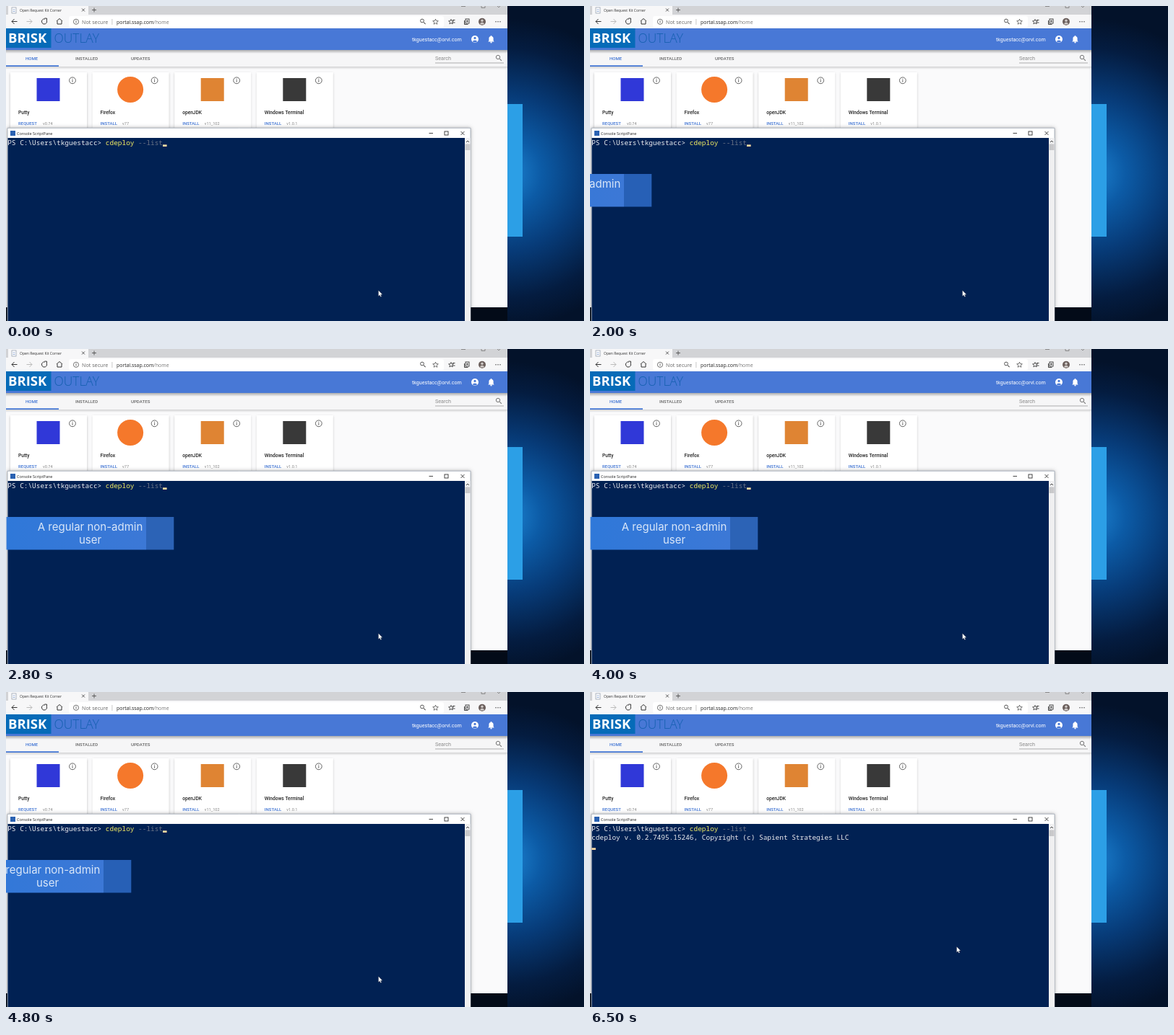
Animation of 800x437 px, one loop 8 s. Source, as an HTML page with a canvas:

```html
<!DOCTYPE html>
<html lang="en">
<head>
<meta charset="utf-8">
<title>Deploy demo</title>
<style>
html, body { margin: 0; width: 100%; height: 100%; overflow: hidden; background: #03122a; }
canvas { display: block; width: 800px; height: 437px; }
</style>
</head>
<body>
<canvas id="stage" width="800" height="437"></canvas>
<script>
const LOOP = 8000, STEP = 100;
const ctx = document.getElementById('stage').getContext('2d');
const ROBOTO = 'Roboto, sans-serif';
const UI = '"Open Sans", sans-serif';
const MONO = '"Noto Sans Mono", monospace';
const BLUE = '#3f74d4';

function rect(x, y, w, h, color) {
  ctx.fillStyle = color;
  ctx.fillRect(x, y, w, h);
}

function text(str, x, y, size, color, family = ROBOTO, weight = 400, align = 'left') {
  ctx.font = `${weight} ${size}px ${family}`;
  ctx.textAlign = align;
  ctx.fillStyle = color;
  ctx.fillText(str, x, y);
}

function disc(x, y, r, color) {
  ctx.fillStyle = color;
  ctx.beginPath();
  ctx.arc(x, y, r, 0, Math.PI * 2);
  ctx.fill();
}

function ring(x, y, r, color, width = 0.9, from = 0, to = Math.PI * 2) {
  ctx.strokeStyle = color;
  ctx.lineWidth = width;
  ctx.beginPath();
  ctx.arc(x, y, r, from, to);
  ctx.stroke();
}

function path(points, color, width = 1, close = false) {
  ctx.strokeStyle = color;
  ctx.lineWidth = width;
  ctx.beginPath();
  points.forEach(([x, y], i) => i ? ctx.lineTo(x, y) : ctx.moveTo(x, y));
  if (close) ctx.closePath();
  ctx.stroke();
}

function cross(x, y, r, color, width) {
  path([[x - r, y - r], [x + r, y + r]], color, width);
  path([[x + r, y - r], [x - r, y + r]], color, width);
}

function shade(y, h, alpha) {
  const g = ctx.createLinearGradient(0, y, 0, y + h);
  g.addColorStop(0, `rgba(0,0,0,${alpha})`);
  g.addColorStop(1, 'rgba(0,0,0,0)');
  rect(0, y, 694, h, g);
}

function info(x, y, r, color) {
  ring(x, y, r, color, 0.9);
  rect(x - 0.5, y - 0.6, 1, r * 0.62, color);
  rect(x - 0.5, y - r * 0.55, 1, 1, color);
}

function magnifier(x, y, r, color) {
  ring(x - 1, y - 1, r, color, 1);
  path([[x + r * 0.5, y + r * 0.5], [x + r + 1.2, y + r + 1.2]], color, 1.1);
}

function star(x, y, r, color) {
  const pts = [];
  for (let i = 0; i < 10; i++) {
    const a = i * Math.PI / 5 - Math.PI / 2, d = i % 2 ? r * 0.45 : r;
    pts.push([x + d * Math.cos(a), y + d * Math.sin(a)]);
  }
  path(pts, color, 0.8, true);
}

function desktop() {
  rect(0, 0, 800, 437, '#03122a');
  const glow = ctx.createRadialGradient(690, 232, 10, 690, 232, 215);
  glow.addColorStop(0, '#1a7cca');
  glow.addColorStop(0.2, '#0c5ba6');
  glow.addColorStop(0.48, '#073b78');
  glow.addColorStop(0.8, '#041c40');
  glow.addColorStop(1, '#03122a');
  rect(643, 0, 157, 437, glow);
  rect(531, 136, 184, 184, '#2c9fe6');
  rect(0, 418, 694, 19, '#030b18');
}

function tabStrip() {
  rect(0, 0, 694, 13, '#d2d3d6');
  rect(3, 0, 111, 13, '#f7f7f8');
  ctx.fillStyle = '#fff';
  ctx.fillRect(8, 2, 6, 8);
  ctx.strokeStyle = '#8b96a6';
  ctx.lineWidth = 0.7;
  ctx.strokeRect(8, 2, 6, 8);
  path([[9.5, 5], [12.5, 5]], '#6d8ec4', 0.7);
  path([[9.5, 7.5], [12.5, 7.5]], '#6d8ec4', 0.7);
  text('Open Request Kit Corner', 19, 7.6, 5, '#333', UI);
  cross(107, 5.5, 2, '#333', 0.8);
  path([[119, 5.5], [125, 5.5]], '#444', 0.8);
  path([[122, 2.5], [122, 8.5]], '#444', 0.8);
  path([[630, 0.5], [636, 0.5]], '#777', 0.8);
  path([[658, 0], [658, 2.5], [663, 2.5], [663, 0]], '#777', 0.8);
  path([[680, 0], [682, 2], [684, 0]], '#777', 0.8);
}

function toolbar() {
  rect(0, 12, 694, 19, '#f7f7f8');
  ctx.fillStyle = '#fff';
  ctx.beginPath();
  ctx.roundRect(87, 14, 519, 16, 3);
  ctx.fill();
  path([[15.5, 21.5], [8, 21.5]], '#333', 1);
  path([[11.5, 18], [8, 21.5], [11.5, 25]], '#333', 1);
  path([[28.5, 21.5], [36, 21.5]], '#bbb', 1);
  path([[32.5, 18], [36, 21.5], [32.5, 25]], '#bbb', 1);
  ring(53, 21.5, 3.6, '#333', 1, -0.4, 5);
  path([[53.5, 17], [56.5, 17.2], [56.3, 20]], '#333', 1);
  path([[70, 21], [74, 17.5], [78, 21]], '#333', 1);
  path([[71, 21], [71, 25], [77, 25], [77, 21]], '#333', 1);
  info(97, 21.8, 3.6, '#666');
  text('Not secure', 105, 24.5, 7.2, '#666', UI);
  rect(146.5, 18, 0.8, 8, '#bbb');
  text('portal.ssap.com', 153, 24.5, 6.9, '#222', UI);
  const end = 153 + ctx.measureText('portal.ssap.com').width;
  text('/home', end, 24.5, 6.9, '#777', UI);

  magnifier(577, 21.5, 2.4, '#555');
  star(594.5, 22, 4, '#555');
  star(616, 22, 3.6, '#333');
  path([[618, 23], [621.5, 23]], '#333', 0.9);
  path([[618, 19.5], [621.5, 19.5]], '#333', 0.9);
  ctx.strokeStyle = '#333';
  ctx.lineWidth = 0.9;
  ctx.strokeRect(636, 18, 5, 6);
  path([[634.5, 20], [634.5, 25.5], [639.5, 25.5]], '#333', 0.9);
  path([[637, 21], [640, 21]], '#333', 0.8);
  path([[638.5, 19.5], [638.5, 22.5]], '#333', 0.8);
  disc(659, 21.8, 5, '#6b5f5c');
  disc(659, 20.3, 1.7, '#d0cbc8');
  ctx.fillStyle = '#d0cbc8';
  ctx.beginPath();
  ctx.arc(659, 25.5, 2.8, Math.PI, 0);
  ctx.fill();
  for (const x of [678, 681, 684]) disc(x, 21.8, 0.7, '#333');
}

function header() {
  rect(0, 31, 694, 30, '#4878d6');
  rect(0, 31, 62.5, 27, '#066bb8');
  text('BRISK', 3, 51, 18.5, '#fff', UI, 700);
  text('OUTLAY', 66.5, 51, 17.4, '#1560b0', UI, 300);
  text('tkguestacc@orvl.com', 562, 48.5, 7.1, '#fff');

  disc(649, 46, 5, '#fff');
  disc(649, 44.4, 1.6, '#4878d6');
  ctx.fillStyle = '#4878d6';
  ctx.beginPath();
  ctx.ellipse(649, 48.9, 2.9, 1.5, 0, 0, Math.PI * 2);
  ctx.fill();

  ctx.fillStyle = '#fff';
  ctx.beginPath();
  ctx.moveTo(667.3, 49.5);
  ctx.lineTo(668.4, 48);
  ctx.lineTo(668.4, 45);
  ctx.arc(671.5, 45, 3.1, Math.PI, 0);
  ctx.lineTo(674.6, 48);
  ctx.lineTo(675.7, 49.5);
  ctx.fill();
  disc(671.5, 50.4, 1.1, '#fff');
  disc(671.5, 41.8, 0.9, '#fff');
}

function nav() {
  rect(0, 61, 694, 23, '#f6f6f7');
  shade(61, 5, 0.3);
  text('HOME', 27, 75, 6.1, BLUE, ROBOTO, 500);
  text('INSTALLED', 96, 75, 6.1, '#666', ROBOTO, 500);
  text('UPDATES', 173, 75, 6.1, '#666', ROBOTO, 500);
  rect(0, 82.3, 73, 1.7, BLUE);
  text('Search', 594, 75, 7.2, '#8a8a8a');
  rect(594, 78.6, 95, 0.8, '#999');
  magnifier(682, 72, 2.7, '#777');
  shade(84, 4, 0.16);
}

const apps = [
  { name: 'Putty', action: 'REQUEST', version: 'v0.74', color: '#3038d8' },
  { name: 'Firefox', action: 'INSTALL', version: 'v77', color: '#f5782b', round: true },
  { name: 'openJDK', action: 'INSTALL', version: 'v11_102', color: '#df8433' },
  { name: 'Windows Terminal', action: 'INSTALL', version: 'v1.0.1', color: '#393939' }
];

function card(app, i) {
  const x = 6 + i * 113.6;
  ctx.save();
  ctx.shadowColor = 'rgba(0,0,0,.25)';
  ctx.shadowBlur = 3;
  ctx.shadowOffsetY = 0.8;
  rect(x, 92, 106, 90, '#fff');
  ctx.restore();
  if (app.round) disc(x + 52.5, 116, 18, app.color);
  else rect(x + 36.5, 100, 32, 32, app.color);
  info(x + 86, 103.3, 4.4, '#555');
  text(app.name, x + 11, 150, 6.6, '#222', ROBOTO, 500);
  text(app.action, x + 11, 165, 6, BLUE, ROBOTO, 500);
  text(app.version, x + (i ? 41.5 : 45), 165, 5.6, '#888');
}

function browser() {
  rect(0, 0, 694, 418, '#fafafb');
  tabStrip();
  toolbar();
  header();
  nav();
  apps.forEach(card);
}

function consoleWindow(t) {
  ctx.save();
  ctx.shadowColor = 'rgba(0,0,0,.35)';
  ctx.shadowBlur = 5;
  rect(2, 169, 641, 270, '#fff');
  ctx.restore();
  path([[2, 437], [2, 169.3], [643, 169.3], [643, 437]], '#8f98a8', 0.7);
  rect(6, 173, 7, 7, '#2b62b2');
  text('Console ScriptPane', 15, 178.6, 5.5, '#222', UI);
  path([[585.5, 176.5], [591, 176.5]], '#333', 0.9);
  ctx.strokeStyle = '#333';
  ctx.lineWidth = 0.9;
  ctx.strokeRect(607, 174, 5, 5);
  cross(632, 176.5, 2.5, '#333', 0.9);

  rect(2.5, 183, 632.5, 254, '#012153');
  rect(635, 183, 7.7, 254, '#f0f0f1');
  path([[637, 189], [639, 187], [641, 189]], '#444', 1);
  rect(635.5, 191.5, 7, 8.5, '#c9c9cb');

  const size = 9.44, entered = t >= 6200;
  let x = 2.2;
  for (const [part, color] of [
    ['PS C:\\Users\\tkguestacc> ', '#eeedf0'],
    ['cdeploy ', '#f4ec63'],
    ['--list', '#6b7386']
  ]) {
    text(part, x, 193, size, color, MONO);
    x += ctx.measureText(part).width;
  }
  if (t >= 6300) {
    text('cdeploy v. 0.2.7495.15246, Copyright (c) Sapient Strategies LLC',
      2.2, 205, size, '#eeedf0', MONO);
  }
  const row = t >= 6300 ? 2 : 1;
  if (entered) rect(2.3, 192.3 + row * 12, 5.6, 2.7, '#fbd9a2');
  else rect(217, 192.3, 5.6, 2.7, '#fbd9a2');
}

// Distance of the caption left of its resting place
function captionShift(t) {
  const slide = 233;
  if (t < 2800) return slide * Math.pow(1 - (t - 1900) / 900, 3.9);
  if (t < 4200) return 0;
  return slide * Math.pow((t - 4200) / 900, 3.4);
}

function caption(t) {
  if (t <= 1900 || t >= 5100) return;
  const shift = captionShift(t);
  ctx.save();
  ctx.translate(-Math.round(shift), 0);
  const g = ctx.createLinearGradient(0, 0, 194, 0);
  g.addColorStop(0, '#2f78d9');
  g.addColorStop(1, '#3c78d6');
  rect(0.6, 233, 193.4, 45.5, g);
  rect(194, 233, 38.3, 45.5, shift > 3 ? '#2760b6' : '#2c63b6');
  text('A regular non-admin', 116.5, 252, 15, '#d9e6f8', 'Inter, sans-serif', 400, 'center');
  text('user', 116.5, 269.5, 15, '#d9e6f8', 'Inter, sans-serif', 400, 'center');
  ctx.restore();
}

function pointer(x, y) {
  ctx.save();
  ctx.translate(x, y);
  ctx.beginPath();
  for (const [px, py] of [[0, 0], [0, 8], [1.8, 6.4], [3, 9], [4.3, 8.4], [3.1, 5.9], [5.5, 5.7]]) {
    ctx.lineTo(px, py);
  }
  ctx.closePath();
  ctx.fillStyle = '#fff';
  ctx.fill();
  ctx.strokeStyle = 'rgba(0,0,0,.5)';
  ctx.lineWidth = 0.4;
  ctx.stroke();
  ctx.restore();
}

function draw(t) {
  desktop();
  browser();
  consoleWindow(t);
  caption(t);
  if (t < 5100) pointer(515.5, 394.5);
  else if (t >= 6400) pointer(507.5, 353.2);
}

const start = performance.now();
function tick() {
  const t = Math.max(0, performance.now() - start) % LOOP;
  draw(Math.floor(t / STEP) * STEP);
  requestAnimationFrame(tick);
}
tick();
</script>
</body>
</html>
```
